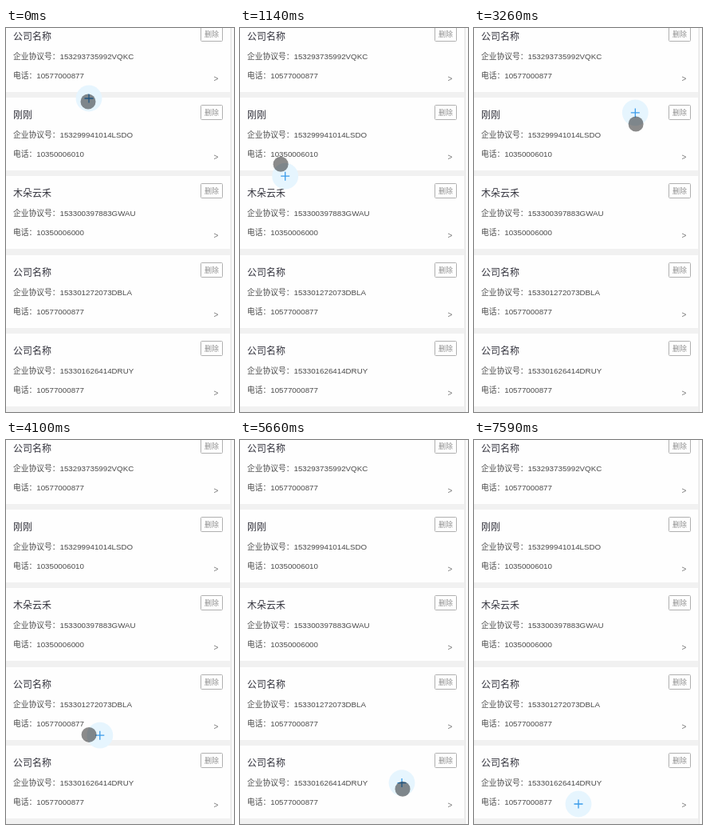
These frames come from a looping animation (286 px wide and 480 px high, 8280 ms). An HTML page:

```html
<!DOCTYPE html>
<html lang="zh-CN">
<head>
<meta charset="utf-8">
<title>拖动按钮</title>
<style>
  html, body { margin: 0; width: 100%; height: 100%; overflow: hidden; background: #fff; }
  svg { display: block; width: 286px; height: 480px; }
  text { font: 9.75px "Liberation Sans", "Noto Sans CJK SC", "Noto Sans CJK", sans-serif; fill: #4a4a4a; }
  .title { font-size: 12px; fill: #33333d; }
  .del { font-size: 9px; fill: #8e8e8e; }
  .more { font-size: 10px; fill: #777; }
</style>
</head>
<body>
<svg viewBox="0 0 286 480">
  <rect width="286" height="480" fill="#fbfbfb"/>
  <rect width="282" height="480" fill="#f1f1f1"/>
  <rect x="282" width="1" height="480" fill="#e6e6e6"/>
  <g id="list"></g>
  <g id="add">
    <circle r="16.4" fill="#e6f5fe" fill-opacity=".98"/>
    <path d="M-5.5 0H5.5M0 -5.5V5.5" stroke="#3a9bea" stroke-width="1.3"/>
  </g>
  <circle id="touch" r="9.5" fill="#000" fill-opacity=".45"/>
</svg>
<script>
const LOOP = 8280, STEP = 140, DELAY = 10, LAST = 54; // ms, ms, ms, final step
const SPACING = 3; // steps between key points
const LEAD = 0.25; // steps by which the finger runs ahead of the button
const PITCH = 98.35;

const cards = [
  ["公司名称", "153293735992VQKC", "10577000877"],
  ["刚刚", "153299941014LSDO", "10350006010"],
  ["木朵云禾", "153300397883GWAU", "10350006000"],
  ["公司名称", "153301272073DBLA", "10577000877"],
  ["公司名称", "153301626414DRUY", "10577000877"]
];

// Evenly timed points of the drag: clockwise loops, then rest at the bottom
const path = [
  [104, 88], [190, 200], [112, 305], [53, 125], [200, 85], [200, 322], [45, 295],
  [172, 78], [209, 151], [215, 360], [85, 340], [165, 130], [215, 282], [198, 408],
  [222, 448], [245, 463], [206, 458], [146, 458], [131, 455]
];

const label = (cls, x, y, s) => `<text class="${cls}" x="${x}" y="${y}">${s}</text>`;

document.getElementById("list").innerHTML = cards.map(([name, code, tel], i) =>
  `<g transform="translate(0 ${Math.floor(i * PITCH)})">
    <rect y="-11" width="281" height="91" fill="#fefefe"/>
    ${label("title", 9, 15, name)}
    ${label("", 9, 39, "企业协议号：" + code)}
    ${label("", 9, 63, "电话：" + tel)}
    <rect x="244.5" y="-1.5" width="27" height="18" rx="1" fill="none" stroke="#b0b0b0"/>
    ${label("del", 249, 11.4, "删除")}
    ${label("more", 260.5, 67, "&gt;")}
  </g>`).join("");

// Mirrored ends make the drag start and stop at rest
function key(i, axis) {
  const n = path.length - 1;
  return path[n - Math.abs(n - Math.abs(i))][axis];
}

// Catmull-Rom curve: position and speed per step on one axis
function along(step, axis) {
  const i = Math.floor(step / SPACING), u = step / SPACING - i;
  const [a, b, c, d] = [-1, 0, 1, 2].map(n => key(i + n, axis));
  const c1 = (c - a) / 2, c2 = a - 2.5 * b + 2 * c - d / 2, c3 = (d - a + 3 * (b - c)) / 2;
  return {
    pos: b + u * (c1 + u * (c2 + u * c3)),
    speed: (c1 + u * (2 * c2 + 3 * u * c3)) / SPACING
  };
}

const add = document.getElementById("add"), touch = document.getElementById("touch");
const place = (el, x, y) => el.setAttribute("transform", `translate(${x.toFixed(1)} ${y.toFixed(1)})`);

const begin = performance.now();
function draw() {
  const now = (performance.now() - begin) % LOOP;
  const step = Math.min(LAST, Math.max(0, Math.floor((now - DELAY) / STEP)));
  const x = along(step, 0), y = along(step, 1);
  place(add, x.pos, y.pos);
  place(touch, x.pos - 1 + x.speed * LEAD, y.pos + 4 + y.speed * LEAD);
  touch.style.display = step === LAST ? "none" : "";
  requestAnimationFrame(draw);
}
draw();
</script>
</body>
</html>
```
